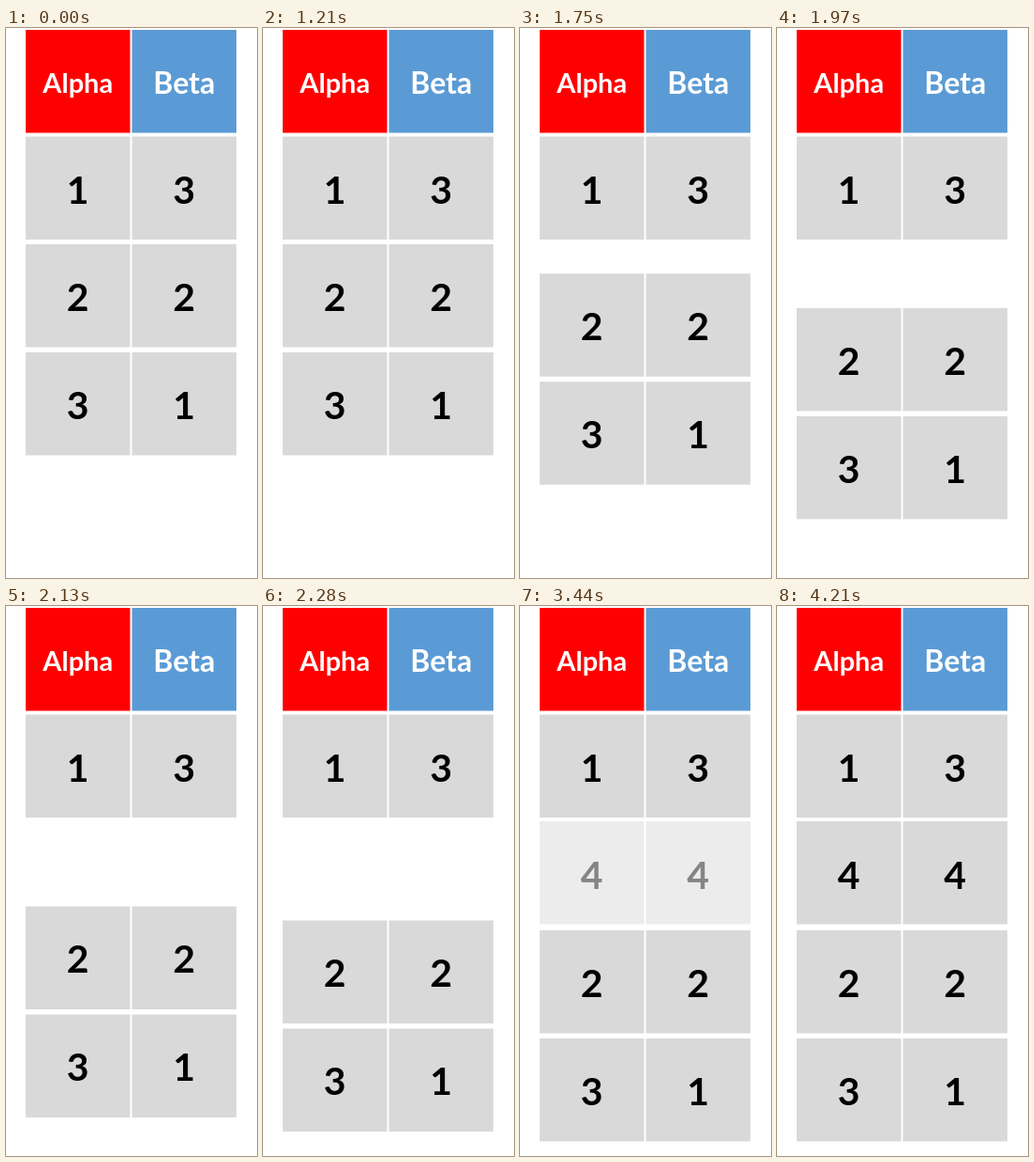
These frames come from a looping animation (268 px wide and 585 px high, 4.46 s). An HTML page:

```html
<!DOCTYPE html>
<html lang="en">
<head>
<meta charset="utf-8">
<title>Row insertion</title>
<style>
  html, body { margin: 0; width: 100%; height: 100%; overflow: hidden; background: #fff; }
  svg { display: block; width: 100%; height: 100%; }
  text { font: 700 41px Lato, Carlito, sans-serif; text-anchor: middle; }
</style>
</head>
<body>
<svg id="stage" viewBox="0 0 268 585"></svg>
<script>
const LOOP = 4460;
const STEP = 76.5;
const ROW_SHIFT = 115;
const COLUMNS = [21, 134.5];
const CELL = { w: 111.5, h: 109.5 };
const stage = document.getElementById('stage');

function add(parent, tag, attrs, label) {
  const node = document.createElementNS('http://www.w3.org/2000/svg', tag);
  for (const key in attrs) node.setAttribute(key, attrs[key]);
  if (label) node.textContent = label;
  return parent.appendChild(node);
}

function addCell(parent, column, y, label, fill, textStyle) {
  const x = COLUMNS[column];
  add(parent, 'rect', { x, y, width: CELL.w, height: CELL.h, fill });
  add(parent, 'text', { x: x + CELL.w / 2, ...textStyle }, label);
}

function addRow(parent, y, labels, baseline = y + 71) {
  labels.forEach((label, i) => addCell(parent, i, y, label, '#d9d9d9', { y: baseline }));
}

addCell(stage, 0, 2, 'Alpha', '#ff0000', { y: 69, fill: '#fff', style: 'font-size:29px' });
addCell(stage, 1, 2, 'Beta', '#5b9bd5', { y: 70, fill: '#fff', style: 'font-size:32px' });
addRow(stage, 115.5, ['1', '3']);

const inserted = add(stage, 'g', {});
addRow(inserted, 229, ['4', '4'], 300.5);

const lower = add(stage, 'g', {});
addRow(lower, 230, ['2', '2']);
addRow(lower, 345, ['3', '1']);

const progress = (t, start, end) => Math.min(1, Math.max(0, (t - start) / (end - start)));
const easeInOut = x => x < 0.5 ? 2 * x * x : 1 - 2 * (1 - x) ** 2;

// Both movements advance in short held steps.
function draw(time) {
  const t = 1210 + Math.floor((time - 1200) / STEP) * STEP;
  const shift = ROW_SHIFT * easeInOut(progress(t, 1273, 2555));
  lower.setAttribute('transform', `translate(0 ${shift.toFixed(2)})`);
  inserted.setAttribute('opacity', progress(t, 2745, 4190).toFixed(3));
}

const begin = performance.now();
function tick() {
  draw((performance.now() - begin) % LOOP);
  requestAnimationFrame(tick);
}
draw(0);
requestAnimationFrame(tick);
</script>
</body>
</html>
```
